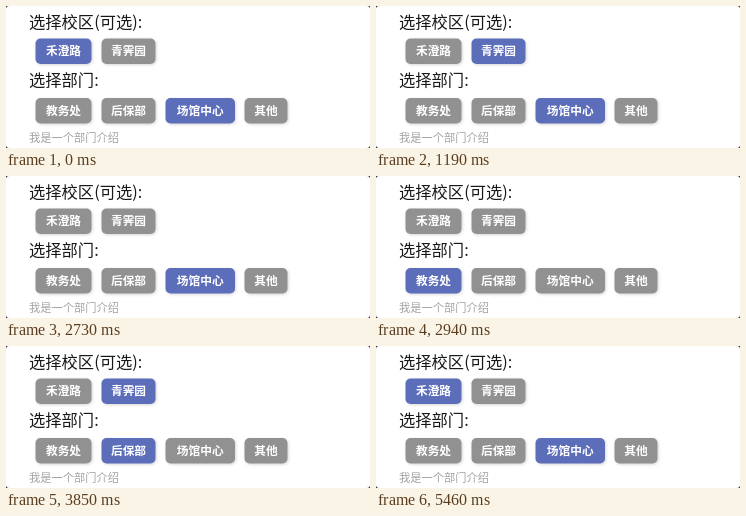
Recreate the animation shown at these times as an HTML page. Size 364 by 142 pixels, loop 5.6 s.

```html
<!DOCTYPE html>
<html lang="zh-CN">
<head>
<meta charset="utf-8">
<title>选择部门</title>
<style>
  :root { --idle: #919191; --active: #5c6db9; --half: #777ea5; }
  html, body { margin: 0; width: 100%; height: 100%; overflow: hidden; background: #222; }
  svg { display: block; width: 364px; height: 142px; background: #fff; border-radius: 3px; font-family: "Noto Sans CJK SC", "Noto Sans CJK", sans-serif; }
  .title { font-size: 16.3px; fill: #181818; }
  .intro { font-size: 11.25px; fill: #a3a3a3; }
  .chip text { font-size: 11.7px; font-weight: 700; fill: #fff; text-anchor: middle; }
  .chip rect { fill: var(--idle); filter: drop-shadow(1px 1px 1.5px rgba(0, 0, 0, .16)); animation: 5600ms step-end infinite; }
  .west rect { animation-name: west; }
  .east rect { animation-name: east; }
  .teaching rect { animation-name: teaching; }
  .support rect { animation-name: support; }
  .venue rect { animation-name: venue; }

  /* One step is 70 ms, or 1.25% of the loop. */
  @keyframes west {
    0%, 35%, 75%, 100% { fill: var(--active); }
    21.25%, 37.5% { fill: var(--idle); }
    33.75%, 73.75% { fill: var(--half); }
  }
  @keyframes east {
    0%, 35%, 75%, 100% { fill: var(--idle); }
    21.25%, 68.75% { fill: var(--active); }
    33.75%, 73.75% { fill: var(--half); }
  }
  @keyframes teaching {
    0%, 58.75%, 100% { fill: var(--idle); }
    52.5% { fill: var(--active); }
    57.5% { fill: var(--half); }
  }
  @keyframes support {
    0%, 88.75%, 100% { fill: var(--idle); }
    57.5% { fill: var(--half); }
    58.75% { fill: var(--active); }
  }
  @keyframes venue {
    0%, 88.75%, 100% { fill: var(--active); }
    52.5% { fill: var(--idle); }
  }
</style>
</head>
<body>
<svg viewBox="0 0 364 142">
  <text class="title" x="23" y="21.5">选择校区(可选):</text>
  <g class="chip west"><rect x="29.5" y="32.5" width="56" height="25.5" rx="5"/><text x="57.5" y="49.4">禾澄路</text></g>
  <g class="chip east"><rect x="95.5" y="32.5" width="54" height="25.5" rx="5"/><text x="122.5" y="49.4">青霁园</text></g>

  <text class="title" x="23" y="79.8">选择部门:</text>
  <g class="chip teaching"><rect x="29.5" y="92" width="56" height="25.5" rx="5"/><text x="57.5" y="108.9">教务处</text></g>
  <g class="chip support"><rect x="95.5" y="92" width="54" height="25.5" rx="5"/><text x="122.5" y="108.9">后保部</text></g>
  <g class="chip venue"><rect x="159.5" y="92" width="69.5" height="25.5" rx="5"/><text x="194.2" y="108.9">场馆中心</text></g>
  <g class="chip"><rect x="238.5" y="92" width="43" height="25.5" rx="5"/><text x="260" y="108.9">其他</text></g>

  <text class="intro" x="23" y="135.6">我是一个部门介绍</text>
</svg>
</body>
</html>
```
